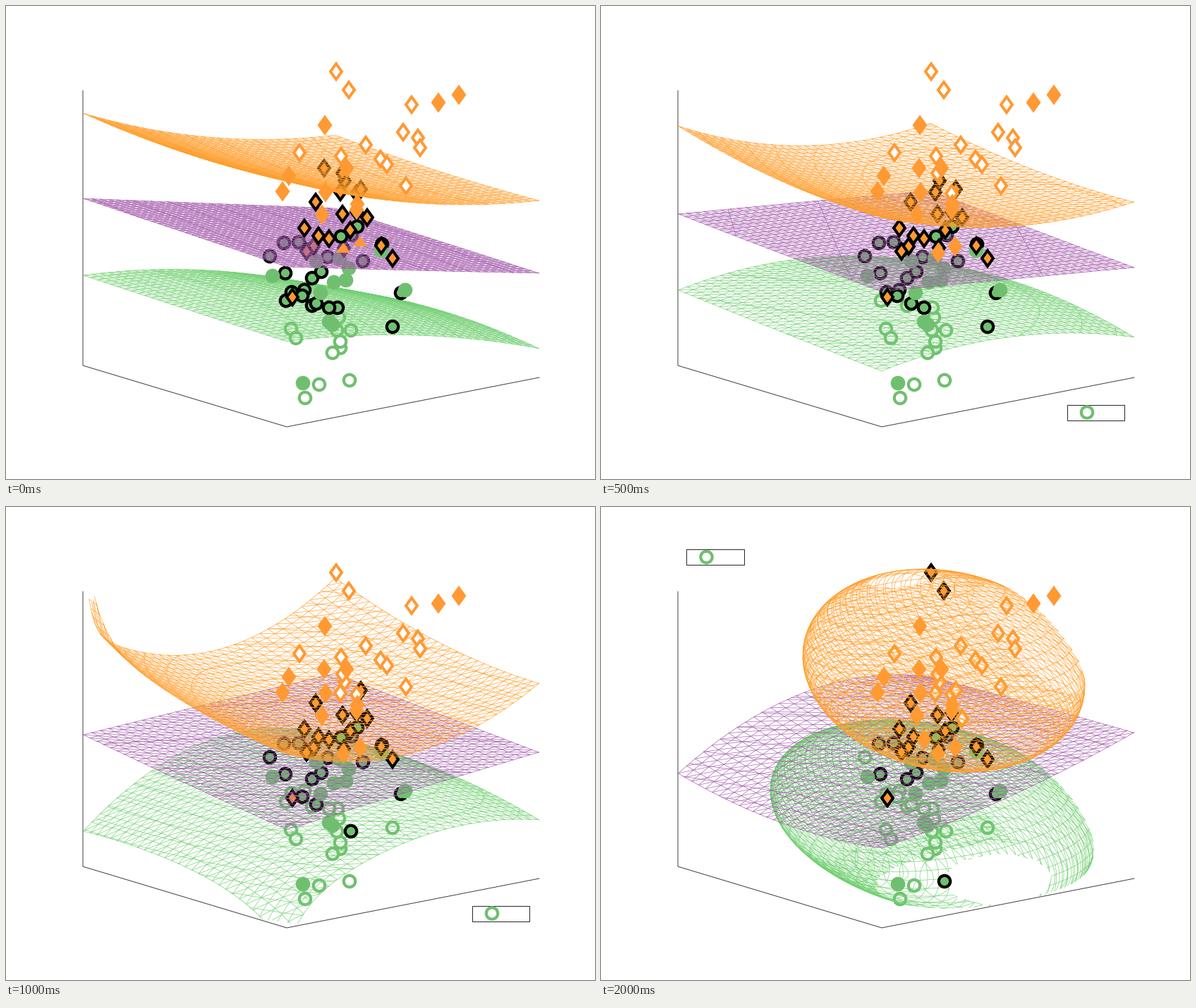
Animation, 835 px wide and 671 px high, one loop 2.5 s. Source, as a matplotlib script:

```python
import numpy as np
import matplotlib.pyplot as plt
from matplotlib.animation import FuncAnimation
from matplotlib.patches import Circle, Polygon, Rectangle

W, H = 835, 671
PX = 0.72  # points per pixel at 100 dpi
TOP = 390  # height of the plot box
CELLS = 30
ORANGE, GREEN = "#ff9933", "#70bf70"
MESH = {"orange": "#ff9f2e", "purple": "#a55cad", "green": "#72d072"}
LAYER = {"green": 2, "purple": 4, "orange": 6}
POSES = [0, 1, 2, 2, 3]

# Heights at the edges of the box floor, clockwise in rows:
# left, left-back, back / left-front, back-right / front, front-right, right
SHEETS = [
    {"green": (128, 100, 38, 124, 53, 121, 95, 41),
     "purple": (237, 195, 153, 232, 151, 227, 187, 148),
     "orange": (358, 289, 257, 345, 250, 349, 283, 251)},
    {"green": (107, 117, 75, 92, 84, 79, 92, 57),
     "purple": (215, 197, 178, 203, 167, 192, 174, 156),
     "orange": (340, 277, 274, 306, 252, 297, 249, 249)},
    {"green": (50, 144, 112, 46, 112, 18, 90, 83),
     "purple": (187, 196, 204, 162, 191, 139, 160, 179),
     "orange": (335, 270, 340, 276, 293, 247, 213, 277)},
    {"purple": (132, 212, 199, 106, 204, 113, 150, 207)},
]
# Centre, half width, half height, shear, depth radius, depth slopes
BLOBS = {"green": (470, 440, 230, 138, 8740, 0.58, -0.0018, 0.0038),
         "orange": (486, 232, 200, 144, 4200, 0.40, -0.0015, 0.0042)}

# Layer digits: 1 below green, 3 below purple, 5 below orange, 7 above all,
# 0 only the upper tip shows
OPEN_DIAMONDS = {
    "7775": [(468, 93), (486, 119)],
    "7777": [(575, 140), (563, 179), (584, 187), (587, 201), (510, 197),
             (416, 208), (475, 213), (531, 217), (540, 225), (567, 255)],
    "5577": [(480, 248), (474, 264)],
    "5777": [(477, 237), (497, 266)],
    "5557": [(503, 260), (512, 300)],
    "3555": [(436, 341), (426, 348), (479, 343)],
    "5555": [(439, 278), (477, 295), (497, 292), (423, 315), (443, 326),
             (488, 318), (532, 340), (548, 358)],
    "5535": [(406, 413)],
}
FULL_DIAMONDS = {
    "7777": [(642, 126), (613, 137), (452, 169), (401, 241), (392, 263),
             (483, 230), (453, 264), (448, 296), (498, 281), (497, 289)],
    "5777": [(451, 230)],
    "5557": [(458, 330)],
    "0777": [(478, 350), (502, 341)],
}
OPEN_CIRCLES = {
    "1111": [(404, 458), (411, 471), (474, 485), (474, 476), (463, 492),
             (424, 556), (444, 537), (472, 442), (469, 460)],
    "1113": [(487, 531)],
    "1131": [(489, 460)],
    "3111": [(470, 428), (434, 425), (397, 418)],
    "3311": [(548, 455), (458, 428), (423, 403), (405, 406)],
    "3331": [(440, 422), (420, 411), (374, 355)],
    "3333": [(396, 379), (434, 386), (447, 377), (506, 362), (394, 336),
             (415, 335), (456, 356), (432, 345), (490, 325), (560, 407)],
    "5555": [(475, 327), (498, 313), (533, 338)],
}
FULL_CIRCLES = {
    "3333": [(378, 383), (421, 535), (446, 407), (465, 392), (482, 389),
             (486, 372), (566, 403), (458, 448), (463, 452), (440, 362),
             (473, 358)],
    "5555": [(532, 347)],
}

fig = plt.figure(figsize=(W / 100, H / 100), dpi=100, facecolor="white")
ax = fig.add_axes([0, 0, 1, 1])


def project(u, v, h):
    return 109 + 289 * u + 358 * v, 510 + 87 * u - 70 * v - h


def basis(t):
    return np.array([(1 - t) * (1 - 2 * t), 4 * t * (1 - t), t * (2 * t - 1)])


def sheet(heights, name, pose):
    l, lk, k, lb, kr, b, br, r = heights
    centre = (lb + kr + lk + br) / 2 - (l + k + b + r) / 4
    grid = np.array([[l, lk, k], [lb, centre, kr], [b, br, r]])
    t = np.linspace(0, 1, 161)
    u, v = np.meshgrid(t, t, indexing="ij")
    h = basis(t).T @ grid @ basis(t)
    if pose == 2 and name == "orange":
        h += 142 * np.exp(-u / 0.069 - v / 0.023)
    if pose == 2 and name == "green":
        h -= 50 * np.exp(-(1 - u) / 0.18 - v / 0.064)
    return u, v, h


def blob(cx, cy, half_w, half_h, shear, depth, slope_x, slope_y):
    theta, phi = np.meshgrid(np.linspace(0, np.pi, 150),
                             np.linspace(0, 2 * np.pi, 260), indexing="ij")
    p, q = np.sin(theta) * np.cos(phi), np.sin(theta) * np.sin(phi)
    skew = shear / half_w
    dx = half_w * p
    dy = skew * p + np.sqrt(half_h**2 - skew**2) * q
    near = depth * np.cos(theta) + slope_x * dx + slope_y * dy
    u = (cx + dx - 109 + 358 * near) / 647
    v = u - near
    return u, v, 510 + 87 * u - 70 * v - cy - dy


def draw_mesh(u, v, h, color, z):
    x, y = project(u, v, h)
    outside = (h < 0) | (h > TOP) | (u < 0) | (u > 1) | (v < 0) | (v > 1)
    unit = np.linspace(0.001, 0.999, CELLS + 1)
    families = [(u, unit), (v, unit),
                (u - v, np.linspace(-1, 1, 2 * CELLS + 1)),
                (h, np.linspace(0, TOP, CELLS + 1))]
    for value, levels in families:
        value = np.ma.masked_where(outside, value)
        used = levels[(levels > value.min()) & (levels < value.max())]
        if len(used):
            ax.contour(x, y, value, levels=used, colors=[color],
                       linewidths=0.65 * PX, linestyles="solid", zorder=z)


def circle(x, y, edge, face, z):
    ax.add_patch(Circle((x, y), 8.2, ec=edge, fc=face, lw=4.2 * PX, zorder=z))


def diamond(x, y, edge, face, z):
    a, b = 8, 11.1
    ax.add_patch(Polygon([(x, y - b), (x + a, y), (x, y + b), (x - a, y)],
                         ec=edge, fc=face, lw=4 * PX, joinstyle="miter",
                         zorder=z))


def draw_markers(groups, shape, color, full, pose):
    for layers, points in groups.items():
        z = int(layers[pose])
        if shape is diamond:
            wrong = z < 7
        else:
            wrong = z > 1 and not full
        edge = "black" if wrong else color
        face = color if wrong or full else "white"
        for x, y in points:
            if z == 0:
                tip = [(x, y - 14), (x + 10, y), (x - 10, y)]
                ax.add_patch(Polygon(tip, fc=color, lw=0, zorder=5))
            else:
                shape(x, y, edge, face, z)


def draw_legend(x, y, w):
    ax.add_patch(Rectangle((x, y), w, 22, fc="white", ec="#262626",
                           lw=PX, zorder=9))
    circle(x + 28.5, y + 11, GREEN, "white", 10)


def update(frame):
    pose = POSES[frame]
    ax.clear()
    ax.set_axis_off()
    corners = [(0, 0, TOP), (0, 0, 0), (1, 0, 0), (1, 1, 0)]
    ax.plot(*zip(*(project(*c) for c in corners)), color="#404040",
            lw=PX, zorder=0)
    for name, heights in SHEETS[pose].items():
        draw_mesh(*sheet(heights, name, pose), MESH[name], LAYER[name])
    if pose == 3:
        draw_mesh(*blob(*BLOBS["green"]), MESH["green"], 2)
        draw_mesh(*blob(*BLOBS["orange"]), MESH["orange"], 7.5)
    draw_markers(OPEN_CIRCLES, circle, GREEN, False, pose)
    draw_markers(FULL_CIRCLES, circle, GREEN, True, pose)
    draw_markers(OPEN_DIAMONDS, diamond, ORANGE, False, pose)
    draw_markers(FULL_DIAMONDS, diamond, ORANGE, True, pose)
    if pose in (1, 2):
        draw_legend(660.5, 565.5, 81.5)
    elif pose == 3:
        draw_legend(121, 60, 82)
    ax.set_xlim(0, W)
    ax.set_ylim(H, 0)
    return []


anim = FuncAnimation(fig, update, frames=len(POSES), interval=500,
                     init_func=lambda: [], repeat=True, repeat_delay=0)
plt.show()
```
